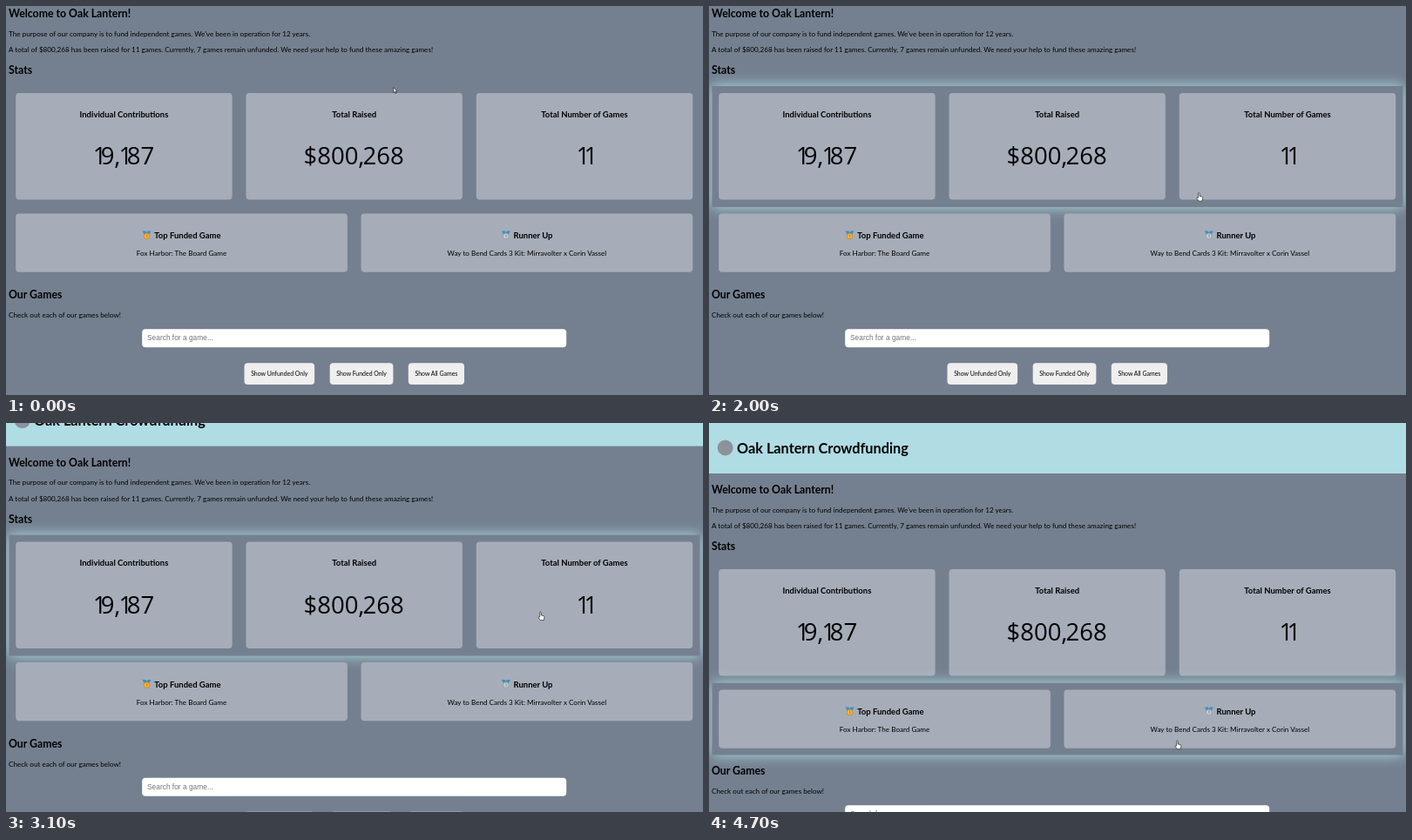
These frames come from a looping animation (800 px wide and 447 px high, 5 s). An HTML page:

```html
<!DOCTYPE html>
<html lang="en">
<head>
<meta charset="utf-8">
<title>Crowdfunding page</title>
<style>
  html, body { margin: 0; width: 100%; height: 100%; overflow: hidden; background: #748090; }
  svg { display: block; width: 100vw; height: 100vh; }
  text { font: 8.12px Lato, sans-serif; white-space: pre; }
  .title { font-size: 16.3px; font-weight: 700; }
  .heading { font-size: 12.3px; font-weight: 700; }
  .label { font-size: 9.5px; font-weight: 700; }
  .number { font: 500 27.5px "Open Sans", sans-serif; }
  .one { letter-spacing: -.24em; }
  .comma { letter-spacing: -.06em; }
  .button { font-size: 6.95px; }
  .hint { font: 8.4px "Liberation Sans", Arial, sans-serif; fill: #757575; }
  .center { text-anchor: middle; }
  .halo { fill: #b0e0e6; filter: blur(7.5px); }
</style>
</head>
<body>
<svg viewBox="0 0 800 447" preserveAspectRatio="none">
  <g id="page"></g>
  <g id="cursor" fill="#fff" stroke="#222" stroke-width=".7" stroke-linejoin="round">
    <path id="arrow" d="M-1.2-3.5V2.6L.2 1.4 1.2 3.6 2.1 3.2 1.2 1H3z"/>
    <path id="hand" d="M-1.3 1V-4q0-.9.8-.9t.8.9v3l2.7.6q1.2.3 1 1.5L3.3 4.7H-.5L-2.8 1.8q-.4-1 .4-1.1z"/>
  </g>
</svg>
<script>
const LOOP = 5000, STEP = 100, SCROLLED = 68;
const BG = '#748090', CARD = '#a6adb9';
const $ = id => document.getElementById(id);

const rect = (x, y, w, h, fill, r = 0) =>
  `<rect x="${x}" y="${y}" width="${w}" height="${h}" rx="${r}" fill="${fill}"/>`;
const text = (x, y, cls, str) => `<text x="${x}" y="${y}" class="${cls}">${str}</text>`;

const glow = (id, y, h) => `<g id="${id}">
  <rect class="halo" x="3.5" y="${y}" width="793" height="${h}"/>${rect(3.5, y, 793, h, BG)}</g>`;

// Narrow ones and commas give the figures proportional spacing
const figures = value => value.replace(/[1,]/g, c =>
  `<tspan class="${c === '1' ? 'one' : 'comma'}">${c}</tspan>`);

const statCard = (x, label, value) => rect(x, 168, 248.4, 122.5, CARD, 4)
  + text(x + 124.2, 195.5, 'label center', label)
  + text(x + 123.7, 250.4, 'number center', figures(value));

const medal = (x, color, edge) => `<g transform="translate(${x} 331)">
  <path d="M-5-4.5H-1L0-2.5 1-4.5H5L2.5.5H-2.5z" fill="#3f8fbd"/>
  <circle cy="1.5" r="3.4" fill="${color}" stroke="${edge}" stroke-width=".6"/>
  <path d="M-.7.5 .3-.2V3.2" fill="none" stroke="${edge}" stroke-width=".8"/></g>`;

const gameCard = (x, medalX, color, edge, label, game) => rect(x, 306.5, 380.7, 67.2, CARD, 4)
  + medal(medalX, color, edge)
  + text(medalX + 8.7, 335.2, 'label', label)
  + text(x + 190.4, 355, 'center', game);

const button = (x, w, label) => rect(x, 478.2, w, 24.8, '#efefef', 4)
  + text(x + w / 2, 493, 'button center', label);

$('page').innerHTML = [
  rect(0, 0, 800, 58, '#b0dce4'),
  '<circle cx="18.7" cy="28.5" r="9" fill="#8c919b"/>',
  text(32, 34.8, 'title', 'Oak Lantern Crowdfunding'),
  text(3, 81, 'heading', 'Welcome to Oak Lantern!'),
  text(3, 102.5, '', "The purpose of our company is to fund independent games. We've been in operation for 12 years."),
  text(3, 121, '', 'A total of $800,268 has been raised for 11 games. Currently, 7 games remain unfunded. We need your help to fund these amazing games!'),
  text(3, 146, 'heading', 'Stats'),
  glow('statsGlow', 160, 139),
  statCard(11.2, 'Individual Contributions', '19,187'),
  statCard(275.5, 'Total Raised', '$800,268'),
  statCard(539.8, 'Total Number of Games', '11'),
  glow('gamesGlow', 298.7, 82.8),
  gameCard(11.2, 161.5, '#f2b43a', '#b9791c', 'Top Funded Game', 'Fox Harbor: The Board Game'),
  gameCard(407.5, 573.8, '#c3cdd3', '#7d8a94', 'Runner Up', 'Way to Bend Cards 3 Kit: Mirravolter x Corin Vassel'),
  text(3, 404.3, 'heading', 'Our Games'),
  text(3, 426.3, '', 'Check out each of our games below!'),
  rect(156.2, 439.2, 487, 21, '#fff', 4),
  text(162, 452.3, 'hint', 'Search for a game...'),
  button(273.5, 80.6, 'Show Unfunded Only'),
  button(371.7, 72.7, 'Show Funded Only'),
  button(461.8, 64.2, 'Show All Games'),
].join('');

// Pointer stops: time, x, y
const stops = [
  [0, 446, 97], [600, 446, 97], [800, 443, 104], [900, 443, 104], [1400, 180, 200.5],
  [1450, 180, 200.5], [2150, 614, 222], [3300, 614, 222], [3700, 380, 350],
  [3900, 380, 350], [4500, 538, 369], [4700, 538, 370], [LOOP, 538, 370],
];

const ramp = (t, from, to) => Math.min(1, Math.max(0, (t - from) / (to - from)));
const ease = (t, from, to) => { const p = ramp(t, from, to); return p * p * (3 - 2 * p); };

function pointer(t) {
  const i = stops.findIndex(s => s[0] > t);
  const [t0, x0, y0] = stops[i - 1], [t1, x1, y1] = stops[i];
  const p = ease(t, t0, t1);
  return [x0 + (x1 - x0) * p, y0 + (y1 - y0) * p];
}

function draw(t) {
  const scroll = SCROLLED * (1 - ease(t, 2954, 3232));
  const moveOn = ramp(t, 3400, 3600);
  $('page').setAttribute('transform', `translate(0 ${-scroll})`);
  $('statsGlow').setAttribute('opacity', ramp(t, 600, 800) * (1 - moveOn));
  $('gamesGlow').setAttribute('opacity', moveOn);
  $('cursor').setAttribute('transform', `translate(${pointer(t)})`);
  $('arrow').style.display = t < 700 ? '' : 'none';
  $('hand').style.display = t < 700 ? 'none' : '';
}

const start = performance.now();
function frame() {
  const t = (performance.now() - start) % LOOP;
  draw(Math.floor(t / STEP) * STEP);
  requestAnimationFrame(frame);
}
frame();
</script>
</body>
</html>
```
